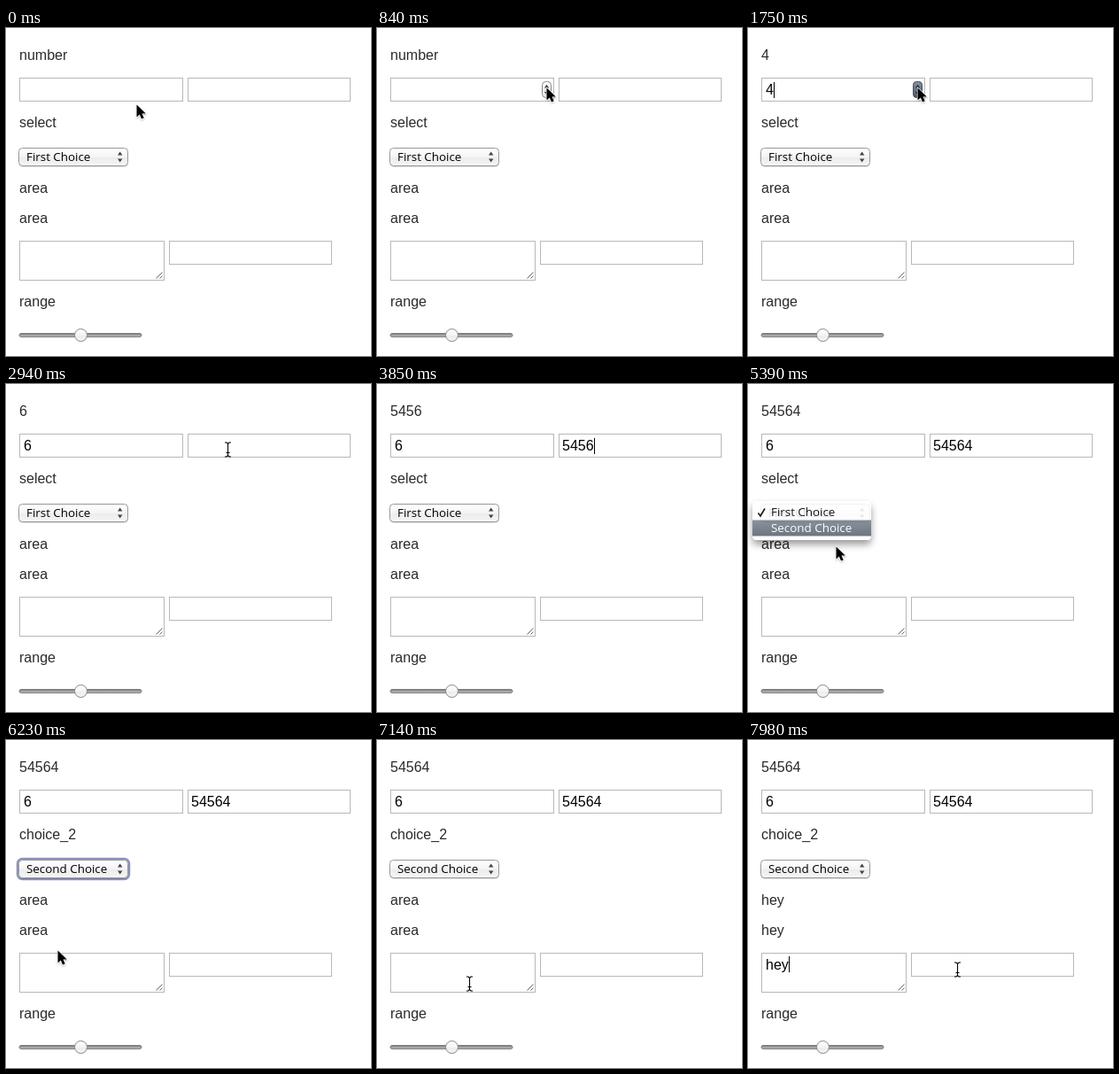
Write an HTML page that moves like this. It is 412 px wide and 370 px high and loops after 8 s.

```html
<!DOCTYPE html>
<html lang="en">
<head>
<meta charset="utf-8">
<title>Form demo</title>
<style>
html, body { margin: 0; width: 100%; height: 100%; overflow: hidden; background: #fff; }
svg { display: block; }
text { font: 16px "Liberation Sans", Arial, sans-serif; white-space: pre; }
.label { fill: #2b2b2b; }
.value { fill: #000; }
.menu { font: 500 13.4px "Open Sans", "Noto Sans", sans-serif; fill: #000; }
.box { fill: #fff; stroke: #b8b8b8; }
</style>
</head>
<body>
<svg width="412" height="370" viewBox="0 0 412 370">
  <defs>
    <linearGradient id="button" x2="0" y2="1">
      <stop offset="0" stop-color="#fff"/><stop offset=".5" stop-color="#f4f4f4"/>
      <stop offset=".52" stop-color="#ececec"/><stop offset="1" stop-color="#f5f5f5"/>
    </linearGradient>
    <linearGradient id="bar" x2="0" y2="1">
      <stop offset="0" stop-color="#7b8490"/><stop offset="1" stop-color="#59636f"/>
    </linearGradient>
    <linearGradient id="pressed" x2="0" y2="1">
      <stop offset="0" stop-color="#8793a6"/><stop offset="1" stop-color="#46546a"/>
    </linearGradient>
    <linearGradient id="track" x2="0" y2="1">
      <stop offset="0" stop-color="#777"/><stop offset="1" stop-color="#c8c8c8"/>
    </linearGradient>
    <filter id="shadow" x="-20%" y="-30%" width="140%" height="190%">
      <feDropShadow dx="0" dy="5" stdDeviation="4.5" flood-opacity=".45"/>
    </filter>
    <filter id="soft" x="-50%" y="-50%" width="200%" height="200%">
      <feDropShadow dx="0" dy="1" stdDeviation=".8" flood-opacity=".3"/>
    </filter>
  </defs>

  <g class="label">
    <text id="numberLabel" x="15" y="36"/>
    <text id="selectLabel" x="15" y="112"/>
    <text id="areaLabel" x="15" y="186"/>
    <text id="areaLabel2" x="15" y="220"/>
    <text x="15" y="314">range</text>
  </g>

  <rect class="box" x="15.5" y="56.5" width="184" height="26"/>
  <rect class="box" x="205.5" y="56.5" width="183" height="26"/>
  <rect class="box" x="15.5" y="240.5" width="163" height="44"/>
  <rect class="box" x="184.5" y="240.5" width="183" height="26"/>
  <path d="M169.5 282.5l7-7M173.5 282.5l3-3" stroke="#666" fill="none"/>

  <g class="value">
    <text id="first" x="20" y="75"/>
    <text id="second" x="209" y="75"/>
    <text id="area" x="20" y="258.5"/>
  </g>
  <rect id="caret" width="1" height="18"/>

  <g id="stepper">
    <rect x="186.5" y="60.5" width="10" height="18" rx="4" fill="url(#button)" stroke="#8a8a8a"/>
    <rect id="press" x="186.5" y="60.5" width="10" height="18" rx="4" fill="url(#pressed)" stroke="#465061"/>
    <path d="M189 67.5l2.5-3.5 2.5 3.5zM189 72l2.5 3.5 2.5-3.5z" fill="#222"/>
  </g>

  <rect id="ring" x="13" y="134" width="126" height="23" rx="5.5" fill="none" stroke="#8d92bd" stroke-width="2.5"/>
  <rect x="15" y="137" width="122.5" height="20" rx="4" fill="#000" opacity=".12"/>
  <rect x="14.5" y="135.5" width="123" height="20" rx="4" fill="url(#button)" stroke="#989898"/>
  <text id="choice" class="menu" x="23" y="150"/>
  <path d="M126 143.5l2.7-4 2.7 4zM126 147.5l2.7 4 2.7-4z" fill="#444"/>

  <rect x="15" y="344.5" width="138" height="4" rx="2" fill="url(#track)" stroke="#757575" stroke-width=".9"/>
  <circle cx="84.5" cy="346.5" r="7" fill="url(#button)" stroke="#858585"/>

  <g id="popup">
    <rect x="5" y="132" width="134" height="44" rx="4.5" fill="#fff" filter="url(#shadow)"/>
    <rect id="row" x="5" width="134" height="18" fill="url(#bar)"/>
    <path id="check" d="M11.5 145.5l2.5 3.5 5-8.5" fill="none" stroke-width="1.7"/>
    <text id="item1" class="menu" x="26" y="149">First Choice</text>
    <text id="item2" class="menu" x="26" y="167">Second Choice</text>
  </g>

  <path id="arrow" d="M.5 .5V14.5L3.8 11.4 6 16.6 8.7 15.5 6.5 10.4H10.8Z" stroke="#fff" stroke-width="1.2" paint-order="stroke" filter="url(#soft)"/>
  <path id="beam" d="M-3 -8h2L.5 -6.5 2 -8h2M.5 -6.5V6.5M-3 8h2L.5 6.5 2 8h2M-1.5 3.5h4" fill="none" stroke="#000" stroke-width="1.1"/>
</svg>
<script>
const LOOP = 8000, STEP = 70;
const el = {};
document.querySelectorAll('svg [id]').forEach(node => el[node.id] = node);

// Pointer path: time, x, y
const path = [
  [0, 147, 86], [280, 181, 69], [350, 181, 69], [560, 196, 77], [840, 191, 67],
  [2030, 191, 67], [2380, 250, 74], [4130, 250, 74], [4200, 251, 84],
  [4620, 103.5, 140.5], [4830, 103.5, 140.5], [5040, 103, 158], [5180, 103, 158],
  [5390, 98.5, 182.5], [5530, 69, 190], [5600, 69, 190], [5740, 67, 189],
  [5810, 67, 189], [6230, 57.5, 237], [6370, 57.5, 237], [6650, 64, 254],
  [6720, 64, 254], [6930, 102, 270], [7070, 102, 270], [7140, 104, 275],
  [7560, 104, 275], [7700, 140, 293], [7910, 238, 262], [7980, 235.5, 259]
];
// Left, top, right, bottom of the areas that take text
const textAreas = [[15, 56, 186, 83], [205, 56, 389, 83], [15, 240, 179, 285], [184, 240, 368, 267]];

const counts = [1120, 1470, 1610, 1750, 1890, 2030];
const digitKeys = [3080, 3360, 3640, 3850, 3990];
const letterKeys = [7210, 7420, 7560];

const within = (t, from, to) => t >= from && t < to;
const passed = (times, t) => times.filter(time => t >= time).length;
const show = (node, on) => node.setAttribute('visibility', on ? 'visible' : 'hidden');
const setText = (node, value) => { if (node.textContent !== value) node.textContent = value; };

function pointerAt(t) {
  const next = path.findIndex(p => p[0] > t);
  if (next < 0) return path[path.length - 1].slice(1);
  const [t0, x0, y0] = path[next - 1], [t1, x1, y1] = path[next];
  const k = (t - t0) / (t1 - t0);
  return [x0 + (x1 - x0) * k, y0 + (y1 - y0) * k];
}

function drawPointer(t) {
  const [x, y] = pointerAt(t);
  const hidden = within(t, 3080, 4130) || within(t, 7210, 7560);
  const overText = textAreas.some(([l, top, r, b]) => x >= l && x <= r && y >= top && y <= b);
  show(el.arrow, !hidden && !overText);
  show(el.beam, !hidden && overText);
  const move = `translate(${Math.round(x)} ${Math.round(y)})`;
  el.arrow.setAttribute('transform', move);
  el.beam.setAttribute('transform', move);
}

function drawCaret(t, count, digits, letters) {
  const digitWidth = 8.9;
  let x = 20, y = 61, on = true;
  if (within(t, 280, 840) || within(t, 1120, 2310)) {
    x = count ? 29 : 20;
  } else if (within(t, 2380, 2940) || within(t, 3080, 4550)) {
    x = Math.round(209 + digits * digitWidth);
  } else if (within(t, 6580, 7140) || t >= 7210) {
    x = [20, 29, 38, 46][letters];
    y = 244;
  } else {
    on = false;
  }
  show(el.caret, on);
  el.caret.setAttribute('x', x);
  el.caret.setAttribute('y', y);
}

function drawPopup(t) {
  const open = within(t, 4690, 5530);
  show(el.popup, open);
  el.popup.setAttribute('opacity', t < 5390 ? 1 : t < 5460 ? .88 : .45);
  const lower = t >= 4970;
  el.row.setAttribute('y', lower ? 153.5 : 136);
  el.check.setAttribute('stroke', lower ? '#000' : '#fff');
  el.item1.style.fill = lower ? '#000' : '#fff';
  el.item2.style.fill = lower ? '#fff' : '#000';
}

function draw(time) {
  const t = Math.floor(time % LOOP / STEP) * STEP;
  const count = passed(counts, t);
  const digits = passed(digitKeys, t);
  const letters = passed(letterKeys, t);
  const number = '54564'.slice(0, digits), word = 'hey'.slice(0, letters);
  const chosen = t >= 5530;

  setText(el.first, count ? String(count) : '');
  setText(el.second, number);
  setText(el.area, word);
  setText(el.numberLabel, number || (count ? String(count) : 'number'));
  setText(el.selectLabel, chosen ? 'choice_2' : 'select');
  setText(el.areaLabel, word || 'area');
  setText(el.areaLabel2, word || 'area');
  setText(el.choice, chosen ? 'Second Choice' : 'First Choice');

  show(el.stepper, within(t, 140, 2170));
  show(el.press, within(t, 1120, 1190) || within(t, 1400, 2100));
  show(el.ring, within(t, 5530, 6300));
  drawCaret(t, count, digits, letters);
  drawPopup(t);
  drawPointer(t);
}

const start = performance.now();
function tick() {
  draw(performance.now() - start);
  requestAnimationFrame(tick);
}
tick();
</script>
</body>
</html>
```
